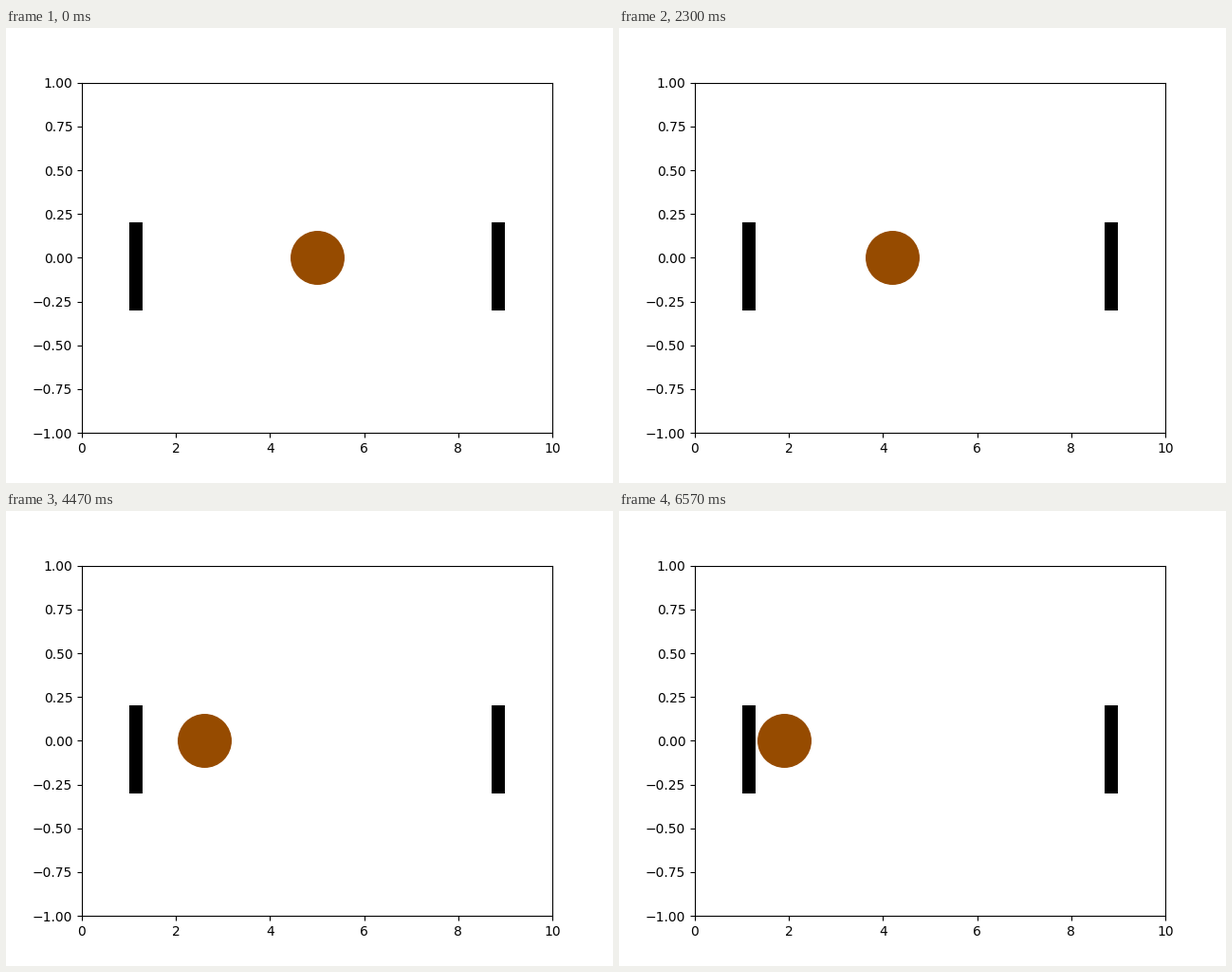
A matplotlib script for the animation above (6.66 s loop, 640x480 px).

```python
import numpy as np
import matplotlib.pyplot as plt
from matplotlib.animation import FuncAnimation
from matplotlib.patches import Rectangle

FRAMES = 200
INTERVAL = 33.3          # ms, 200 frames make 6660 ms
CENTER, SWING = 5, 3.12
PERIOD = 72              # frames per full swing

fig, ax = plt.subplots(figsize=(6.4, 4.8), dpi=100)
ax.set_xlim(0, 10)
ax.set_ylim(-1, 1)

for left in (1, 8.7):
    ax.add_patch(Rectangle((left, -0.3), 0.3, 0.5, fc="black", lw=0))

ball, = ax.plot([CENTER], [0], "o", color="#964B00", markersize=40)


def update(i):
    x = CENTER + SWING * np.sin(2 * np.pi * i / PERIOD)
    ball.set_data([round(x, 6)], [0])
    return ball,


anim = FuncAnimation(fig, update, frames=FRAMES, interval=INTERVAL,
                     repeat=True, repeat_delay=0)

plt.show()
```
